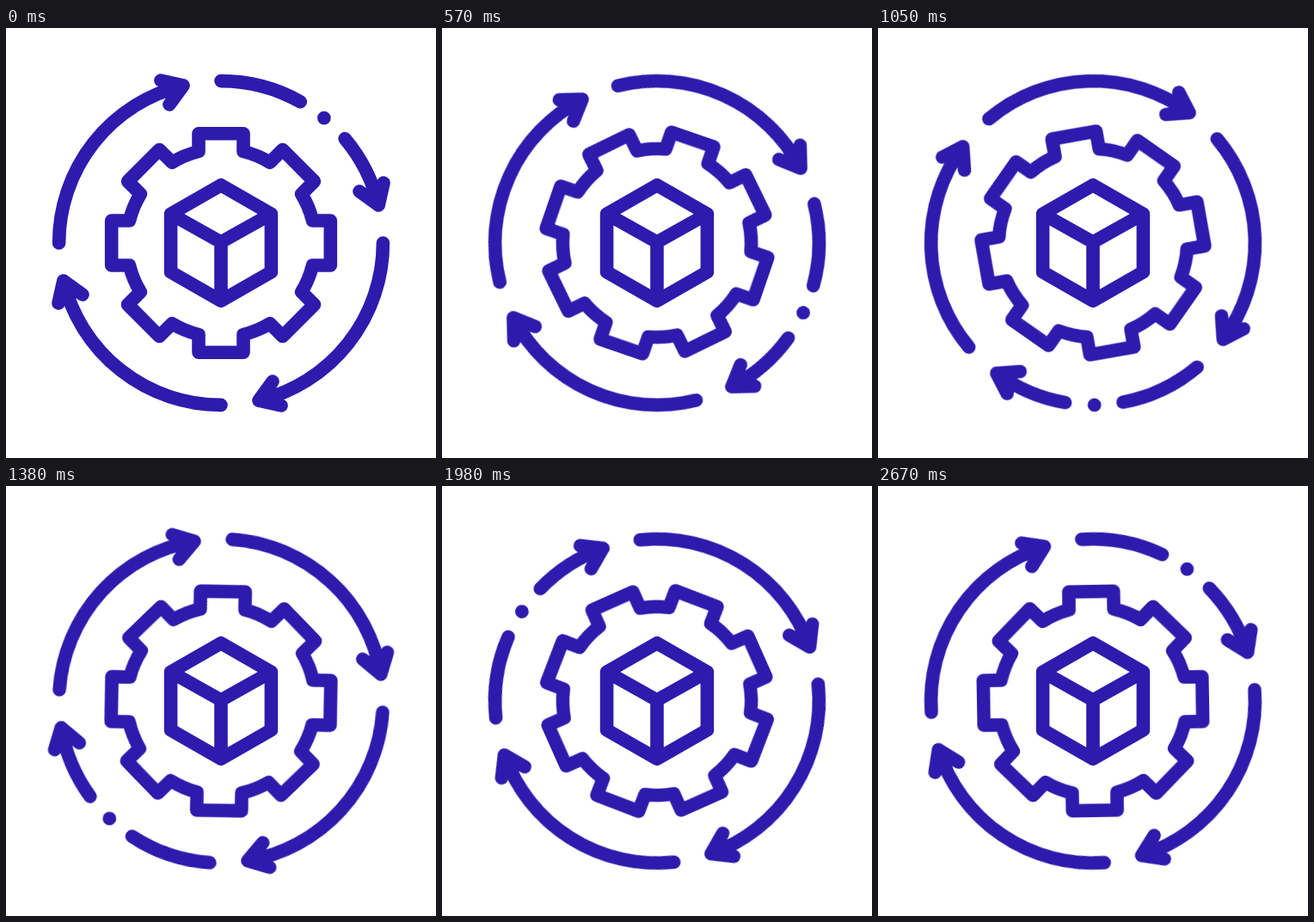
An HTML page that plays this animation: 500 px wide and 500 px high, repeating every 2700 ms.

```html
<!DOCTYPE html>
<html lang="en">
<head>
<meta charset="utf-8">
<title>Process cycle</title>
<style>
  html, body { margin: 0; width: 100%; height: 100%; overflow: hidden; background: #fff; }
  svg { display: block; width: 100vw; height: 100vh; }
  path { fill: none; stroke: #2e1bad; stroke-width: 15.6; stroke-linecap: round; stroke-linejoin: round; }
</style>
</head>
<body>
<svg viewBox="-250 -250 500 500">
  <g id="ring"><path></path></g>
  <g id="gear"><path></path></g>
  <path d="M0-67.3 58.4-33.8V33.8L0 67.3-58.4 33.8V-33.8ZM-58.4-33.8 0-1 58.4-33.8M0-1V67.3"/>
</svg>
<script>
const LOOP = 2700, STEPS = 90;
const R = 188.4, TIP = 76.5;
const TOOTH = 26, OUTER = 127.3, ROOT = 106.5;
const rad = deg => deg * Math.PI / 180;

// Rotates a point clockwise about the centre and formats it for a path.
function turn(x, y, deg) {
  const c = Math.cos(rad(deg)), s = Math.sin(rad(deg));
  return `${(x * c - y * s).toFixed(2)} ${(x * s + y * c).toFixed(2)}`;
}

// Angles run clockwise from the top.
const arc = (from, to) => `M${turn(0, -R, from)}A${R} ${R} 0 0 1 ${turn(0, -R, to)}`;
const head = a => `M${turn(161, -60, a)}L${turn(0, -R, a + TIP)}L${turn(189, -70, a)}`;

function ringPath() {
  let d = arc(0, 29.3) + `M${turn(0, -R, 39.5)}h.01` + arc(49.9, TIP) + head(0);
  for (const a of [90, 180, 270]) d += arc(a, a + TIP) + head(a);
  return d;
}

function gearPath() {
  const r = Math.hypot(TOOTH, ROOT);
  let d = `M${turn(-TOOTH, -ROOT, 0)}`;
  for (let a = 0; a < 360; a += 45) {
    d += `L${turn(-TOOTH, -OUTER, a)}L${turn(TOOTH, -OUTER, a)}L${turn(TOOTH, -ROOT, a)}`;
    d += `A${r} ${r} 0 0 1 ${turn(-TOOTH, -ROOT, a + 45)}`;
  }
  return d + 'Z';
}

function spin(id, d, deg) {
  const el = document.getElementById(id);
  el.firstElementChild.setAttribute('d', d);
  // The small lead keeps each step clear of rounding at its boundary.
  el.animate(
    [{ transform: 'rotate(0deg)' }, { transform: `rotate(${deg}deg)` }],
    { duration: LOOP, iterations: Infinity, easing: `steps(${STEPS}, end)`, delay: -4 }
  );
}

spin('ring', ringPath(), 360);
spin('gear', gearPath(), 90);
</script>
</body>
</html>
```
